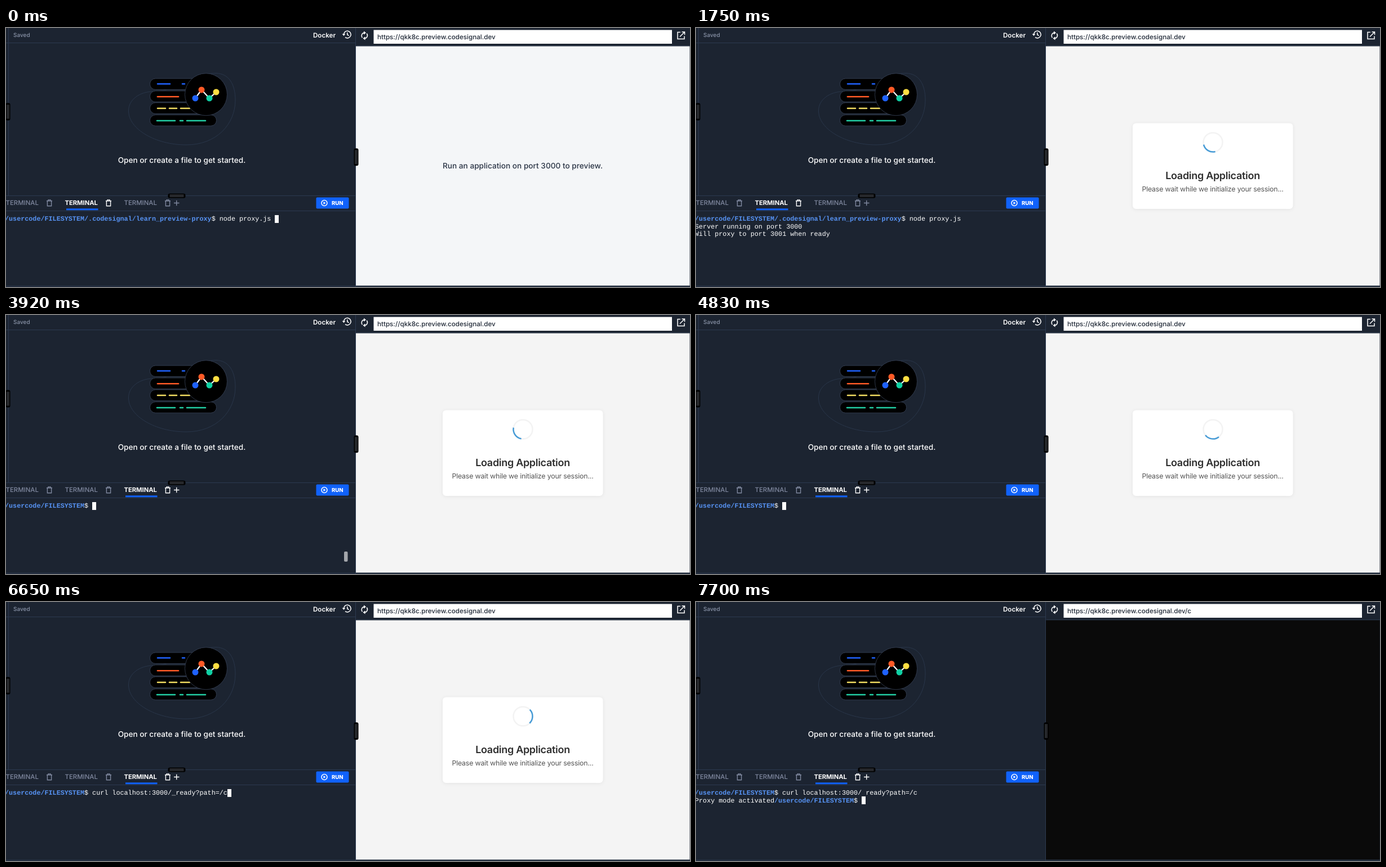
Write an HTML page that moves like this. It is 1214 px wide and 461 px high and loops after 8 s.

```html
<!DOCTYPE html>
<html lang="en">
<head>
<meta charset="utf-8">
<style>
  html, body { margin: 0; width: 100%; height: 100%; overflow: hidden; background: #1c2431; }
  svg { display: block; }
  text { font-family: Inter, sans-serif; font-weight: 500; white-space: pre; text-rendering: geometricPrecision; }
  #term text { font: 11.75px "Liberation Mono", monospace; fill: #fff; }
  #term .path { font-weight: 700; fill: #5793f4; }
  .icon { fill: none; stroke: #fff; stroke-width: 1.5; }
  .tab { color: #8089a0; fill: #8089a0; }
  .tab text { font-size: 11.4px; }
  .tab rect { visibility: hidden; }
  .tab.on { color: #fff; fill: #fff; }
  .tab.on text { font-weight: 700; font-size: 11.2px; }
  .tab.on rect { visibility: visible; }
  .dash { fill: none; stroke-width: 2.6; stroke-linecap: round; }
</style>
</head>
<body>
<svg width="1214" height="461" viewBox="0 0 1214 461">
  <defs>
    <g id="trash" fill="none" stroke="currentColor" stroke-width="1.4">
      <path d="M-5 -3.8H5M-2 -4V-5.6H2V-4M-3.6 -3.5V5.2H3.6V-3.5"/>
    </g>
    <g id="grip">
      <rect x="-4" y="-15.5" width="8" height="31" rx="3" fill="#000"/>
      <path d="M-1.3 -12.5V12.5M1.3 -12.5V12.5" stroke="#777d88" stroke-width=".8"/>
    </g>
  </defs>

  <!-- editor pane -->
  <rect width="1214" height="461" fill="#1c2431"/>
  <path d="M4.5 0V298M0 26.5H621M0 298.5H621M0 325.5H621M0 459.5H1214M620.5 0V461" stroke="#2c3a50" fill="none"/>
  <text x="13" y="16.3" font-size="10" fill="#8a94a8">Saved</text>
  <text x="545" y="17" font-size="11.6" style="font-weight:600" fill="#fff">Docker</text>
  <g class="icon">
    <path d="M599.5 11.5A6.3 6.3 0 1 1 602 16.6M605.8 8V12L608.6 13.6"/>
    <path d="M596.6 10.6H602.4L599.5 14Z" fill="#fff" stroke="none"/>
  </g>

  <path d="M217.5 148C217 127 238 113 262 113C305 113 330 80.5 372 80.5C396 80.5 407 101 407 128C407 172 373 208 320 208C265 208 218 180 217.5 148Z" fill="none" stroke="#29364a"/>
  <g fill="#000" stroke="#39445a" stroke-width=".8">
    <rect x="255.5" y="90" width="100" height="19.5" rx="9.7"/>
    <rect x="255.5" y="112" width="100" height="19.5" rx="9.7"/>
    <rect x="255.5" y="133" width="100" height="19.5" rx="9.7"/>
    <rect x="255.5" y="154.7" width="118" height="19.5" rx="9.7"/>
  </g>
  <g class="dash">
    <path d="M269 99.5H291M313 99.5H317" stroke="#1f62ff"/>
    <path d="M269 122.3H306" stroke="#ff5a26"/>
    <path d="M269 143H283M290 143H303M310 143H326" stroke="#f2dd62"/>
    <path d="M268 165H300M309 165H314M321 165H354" stroke="#22cfa4"/>
  </g>
  <circle cx="355" cy="118.3" r="37.5" fill="#000" stroke="#39445a" stroke-width=".8"/>
  <path d="M336 125L347 110L361 125L373 114" fill="none" stroke="#fff" stroke-width="2.2"/>
  <circle cx="336" cy="125" r="5.5" fill="#1f62ff"/>
  <circle cx="347" cy="110" r="5.5" fill="#ff5a26"/>
  <circle cx="361" cy="125" r="5.5" fill="#0fd0a4"/>
  <circle cx="373" cy="114" r="5.5" fill="#ffde42"/>
  <text x="312" y="240" font-size="13.6" text-anchor="middle" fill="#fff">Open or create a file to get started.</text>

  <!-- terminal pane -->
  <g id="tabs"></g>
  <path id="plus" d="M298 311.5H307.5M302.7 306.8V316.2" stroke-width="1.4"/>
  <rect x="550.5" y="301.5" width="58" height="20" rx="2" fill="#1062fb"/>
  <circle cx="565" cy="311.5" r="5" class="icon"/>
  <path d="M563.5 309V314L567.5 311.5Z" fill="#fff"/>
  <text x="578" y="315" font-size="9.6" style="font-weight:800" fill="#fff">RUN</text>
  <g id="term"></g>
  <rect id="thumb" x="600" y="421" width="6.5" height="18" rx="2" fill="#a3a6ab"/>

  <!-- preview pane -->
  <g class="icon">
    <path d="M632.5 17.3A5.3 5.3 0 0 1 635.5 8.6M640.2 9.7A5.3 5.3 0 0 1 637 18.4"/>
    <path d="M635 5.5L639 8.6L635 11.7ZM637.5 15.3L633.5 18.4L637.5 21.5Z" fill="#fff" stroke="none"/>
    <path d="M1197 7.5H1192V19.5H1204V14.5M1199.5 7H1204.5V12M1204 7.5L1196 15.5"/>
  </g>
  <rect x="652.5" y="3.5" width="529.5" height="24.5" fill="#fff"/>
  <text id="url" x="659" y="20" font-size="11.65" fill="#1f2836"></text>
  <path d="M622 31.5H1214" stroke="#29364a"/>
  <rect id="page" x="621" y="32.5" width="592.5" height="426"/>
  <text id="hint" x="917" y="249.5" font-size="13.65" text-anchor="middle" fill="#2a3445">Run an application on port 3000 to preview.</text>
  <g id="card">
    <rect x="775" y="169.5" width="284.5" height="152.5" rx="6" fill="#fff" style="filter:drop-shadow(0 1px 3px #0001)"/>
    <circle cx="917.5" cy="203.5" r="17" fill="none" stroke="#f3f3f3" stroke-width="2.5"/>
    <path id="arc" d="M905.48 191.48A17 17 0 0 1 929.52 191.48" fill="none" stroke="#469bd6" stroke-width="2.5"/>
    <text x="917" y="268.5" font-size="18" letter-spacing="-.3" text-anchor="middle" style="font-weight:600" fill="#2e2e2e">Loading Application</text>
    <text x="917" y="290.5" font-size="12.4" letter-spacing="-.2" text-anchor="middle" style="font-weight:400" fill="#555">Please wait while we initialize your session...</text>
  </g>

  <use href="#grip" transform="translate(3.5 149)"/>
  <use href="#grip" transform="translate(621.5 229.7)"/>
  <use href="#grip" transform="translate(303 298.7) rotate(90)"/>
</svg>
<script>
const LOOP = 8000, STEP = 70, BLINK = 525;
const at = {
  serverEnter: 840, serverOutput: 910, hintGone: 980, card: 1190,
  switchTab: 3500, thumbGone: 4270, firstKey: 5320, paste: 5460,
  curlEnter: 7210, curlOutput: 7280, url: 7350, app: 7700,
};
const HOME = '/usercode/FILESYSTEM';
const PROXY_DIR = HOME + '/.codesignal/learn_preview-proxy';
const CURL = 'curl localhost:3000/_ready?path=/c';

const $ = id => document.getElementById(id);
const show = (id, visible) => $(id).style.display = visible ? '' : 'none';

$('tabs').innerHTML = [0, 105, 210].map(x => `<g class="tab">
  <text x="${x - .5}" y="315.3">TERMINAL</text>
  <use href="#trash" x="${x + 77}" y="311.5"/>
  <rect x="${x + 2}" y="321.3" width="56.5" height="3" fill="#1062fb"/></g>`).join('');
const tabs = document.querySelectorAll('.tab');

const colX = col => -2 + col * 7.051;
const rowY = row => 333 + row * 13.4;
const put = (row, col, text, cls = '') =>
  `<text class="${cls}" x="${colX(col)}" y="${rowY(row) + 10.3}">${text}</text>`;
const prompt = (row, col, dir, command = '') =>
  put(row, col, dir, 'path') + put(row, col + dir.length, '$ ' + command);
const cursor = (row, col, visible) => visible
  ? `<rect x="${Math.round(colX(col))}" y="${Math.round(rowY(row))}" width="7" height="14" fill="#fff"/>` : '';

// The cursor restarts its blink at each key press or output.
const blinkOn = age => Math.floor(age / BLINK) % 2 === 0;

function serverTerminal(t) {
  let out = prompt(0, 0, PROXY_DIR, 'node proxy.js');
  if (t < at.serverEnter) return out + cursor(0, 68, t < 280 || t >= 770);
  if (t < at.serverOutput) return out + cursor(1, 0, true);
  out += put(1, 0, 'Server running on port 3000') + put(2, 0, 'Will proxy to port 3001 when ready');
  return out + cursor(3, 0, blinkOn(t - at.serverEnter));
}

function curlTerminal(t) {
  const start = HOME.length + 2;
  if (t >= at.curlEnter) {
    // The next row covers the underscore.
    const out = prompt(0, 0, HOME, CURL.replace('_', ' '));
    if (t < at.curlOutput) return out + cursor(1, 0, true);
    return out + put(1, 0, 'Proxy mode activated') + prompt(1, 20, HOME)
      + cursor(1, 20 + start, blinkOn(t - at.curlOutput));
  }
  const [typed, since] = t >= at.paste ? [CURL, at.paste]
    : t >= at.firstKey ? ['c', at.firstKey] : ['', at.switchTab];
  return prompt(0, 0, HOME, typed) + cursor(0, start + typed.length, blinkOn(t - since));
}

let lastStep = -1;
function draw(now) {
  const step = Math.floor(now % LOOP / STEP), t = step * STEP;
  requestAnimationFrame(draw);
  if (step === lastStep) return;
  lastStep = step;

  const second = t < at.switchTab;
  tabs.forEach((tab, i) => tab.classList.toggle('on', i === (second ? 1 : 2)));
  $('plus').setAttribute('stroke', second ? '#8089a0' : '#fff');
  $('term').innerHTML = second ? serverTerminal(t) : curlTerminal(t);
  show('thumb', !second && t < at.thumbGone);

  $('url').textContent = 'https://qkk8c.preview.codesignal.dev' + (t >= at.url ? '/c' : '');
  $('page').setAttribute('fill', t >= at.app ? '#0a0a0a' : t >= at.hintGone ? '#f4f4f4' : '#f4f6f8');
  show('hint', t < at.hintGone);
  show('card', t >= at.card && t < at.app);
  $('arc').setAttribute('transform', `rotate(${step * 24 - 29} 917.5 203.5)`);
}
draw(0);
</script>
</body>
</html>
```
